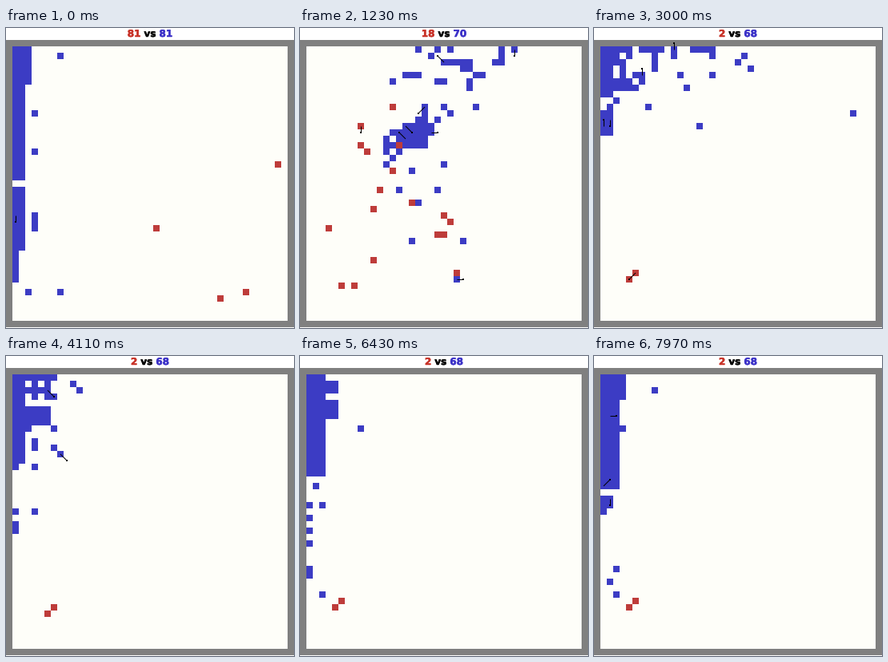
A matplotlib script that plays this animation: 360x376 px, repeating every 8000 ms.

```python
import numpy as np
import matplotlib.pyplot as plt
from matplotlib.animation import FuncAnimation
from matplotlib.collections import LineCollection
from matplotlib.patheffects import withStroke

W, H, DPI = 360, 376, 100
FRAMES, INTERVAL = 250, 32
CELL, LEFT, TOP, SIDE = 8, 8, 23, 43
PAPER, WALL = (254, 254, 249), (128, 128, 128)
RED, BLUE = (190, 60, 58), (60, 60, 196)
PX = 72 / DPI
rng = np.random.default_rng(12)

GRID = [(x, y) for x in range(SIDE) for y in range(SIDE)]
DIRS = [(x, y) for x in (-1, 0, 1) for y in (-1, 0, 1) if x or y]


def crowd(count, sx, sy, *blocks, center=(0, 0)):
    """Solid blocks (x, y, w, h) plus strays thinning out from a center."""
    solid = [(x + i, y + j) for x, y, w, h in blocks
             for j in range(h) for i in range(w)]
    free = [c for c in GRID if c not in solid]
    dist = np.abs(np.array(free) - center) / (sx, sy)
    weight = np.exp(-dist.sum(axis=1))
    picks = rng.choice(len(free), count - len(solid), replace=False,
                       p=weight / weight.sum())
    return solid + [free[i] for i in picks]


def scatter(count, x0, x1, y0, y1):
    spots = [(x, y) for x, y in GRID if x0 <= x < x1 and y0 <= y < y1]
    return [spots[i] for i in rng.choice(len(spots), count, replace=False)]


def match(a, b):
    """Give each end cell its nearest free starter; the rest get None."""
    pairs = sorted(((p[0] - q[0]) ** 2 + (p[1] - q[1]) ** 2, i, j)
                   for i, p in enumerate(a) for j, q in enumerate(b))
    ends, used = [None] * len(a), set()
    for _, i, j in pairs:
        if ends[i] is None and j not in used:
            ends[i] = b[j]
            used.add(j)
    return ends


def walk(start, end, n, spread=0.5):
    """Random walk on the grid, tied down at both ends."""
    u = np.linspace(0, 1, n + 1)[:, None]
    drift = np.vstack([[0, 0], rng.integers(-1, 2, (n, 2)).cumsum(0)])
    start, end = np.array(start), np.array(end)
    path = start + (end - start) * u + spread * (drift - u * drift[-1])
    return np.clip(np.rint(path), 0, SIDE - 1).astype(int)


def phase(a, b, t0, t1, front, last):
    """Living cells at each step; those without an end die on the way."""
    n, ends = t1 - t0, match(a, b)
    doomed = [i for i, e in enumerate(ends) if e is None]
    deaths = dict(zip(rng.permutation(doomed),
                      np.linspace(2, last, len(doomed))))
    steps = {t0 + k: [] for k in range(n + 1)}
    for i, (start, end) in enumerate(zip(a, ends)):
        if end is None:
            end = (np.array(start) + front) / 2 + rng.normal(0, 3, 2)
        for k, cell in enumerate(walk(start, end, n)):
            if k < deaths.get(i, n + 1):
                steps[t0 + k].append(tuple(cell))
    return steps


def settle(team, taken):
    """Move agents off occupied cells to the nearest free one."""
    out = []
    for x, y in team:
        if (x, y) in taken:
            x, y = min((c for c in GRID if c not in taken),
                       key=lambda c: (c[0] - x) ** 2 + (c[1] - y) ** 2)
        taken.add((x, y))
        out.append((x, y))
    return out


def pair(t):
    """The last two hop back and forth along the diagonal."""
    hop = int(0.935 * t - 0.3) % 2
    return [(5 + hop, 35 + hop), (4 + hop, 36 + hop)]


def build():
    # Blue meets red mid-field, pours into the corner, then down the wall
    clash = (crowd(45, 2, 5, (24, 22, 4, 4), (23, 19, 3, 2), center=(25, 21))
             + scatter(26, 14, 41, 0, 10))
    chase = (crowd(60, 9, 3, (25, 0, 3, 2), (13, 0, 2, 3), (2, 1, 2, 2))
             + scatter(8, 10, 17, 8, 34))
    corner = crowd(68, 8, 2.5, (0, 0, 2, 8), (2, 5, 3, 2), (0, 10, 2, 4),
                   (8, 0, 1, 4), (14, 0, 4, 1))
    pack = crowd(68, 3.5, 6, (0, 0, 2, 14), (2, 5, 4, 3), (2, 2, 3, 1),
                 (3, 0, 4, 1))
    wall = crowd(68, 1.5, 10, (0, 0, 3, 16), (3, 4, 2, 3), (3, 1, 2, 2))
    slide = crowd(68, 1.5, 10, (0, 0, 3, 18), (3, 0, 1, 4), (0, 19, 2, 2))
    keys = [(1, scatter(81, 24, 41, 2, 41)), (20, clash), (58, chase),
            (93, corner), (128, pack), (200, wall), (249, slide)]

    # The first picture still shows how the last battle ended
    blue = {0: crowd(81, 1.2, 40, (0, 0, 3, 6), (0, 6, 2, 15),
                     (0, 22, 2, 10), (0, 32, 1, 4))}
    red = {0: [(41, 18), (22, 28), (36, 38), (32, 39)]}
    for (t0, a), (t1, b) in zip(keys, keys[1:]):
        blue.update(phase(a, b, t0, t1, (22, 22), t1 - t0))

    ranks = (scatter(27, 3, 17, 6, 37)
             + crowd(12, 1, 4, (19, 33, 1, 3), center=(22, 27)))
    runner = (13, 31)
    red.update(phase(scatter(81, 2, 19, 2, 41), ranks, 1, 20, (22, 24), 19))
    red.update(phase(ranks, pair(58) + [runner], 20, 58, (14, 26), 30))
    for t in range(59, FRAMES):
        red[t] = pair(t) + [runner] * (t < 66)

    blows = []
    for t in range(FRAMES):
        taken = set()
        red[t] = settle(red[t], taken)
        blue[t] = settle(blue[t], taken)
        fighters = blue[t] + red[t]
        count = min(rng.poisson(10 if 8 < t < 40 else 2.2), 14)
        blows.append([fighters[rng.integers(len(fighters))]
                      + DIRS[rng.integers(8)] for _ in range(count)])
    return blue, red, blows


blue, red, blows = build()

stage = np.full((H, W, 3), 255, np.uint8)
stage[15:375] = WALL
stage[TOP:TOP + SIDE * CELL, LEFT:LEFT + SIDE * CELL] = PAPER

fig = plt.figure(figsize=(W / DPI, H / DPI), dpi=DPI, facecolor="white")
ax = fig.add_axes([0, 0, 1, 1])
ax.axis("off")
picture = ax.imshow(stage, extent=(0, W, H, 0), interpolation="nearest",
                    aspect="auto")
ax.set_xlim(0, W)
ax.set_ylim(H, 0)
lines = ax.add_collection(LineCollection([], colors="black", linewidths=PX))
dots, = ax.plot([], [], "s", color="black", ms=2 * PX, mew=0)
score = [ax.text(0, 11, "", color=c, fontsize=12 * PX, weight="bold",
                 family="DejaVu Sans",
                 path_effects=[withStroke(linewidth=0.5 * PX, foreground=c)])
         for c in ("#c83228", "black", "#3c32c8")]


def paint(img, team, color):
    for x, y in team:
        px, py = LEFT + x * CELL, TOP + y * CELL
        img[py:py + CELL, px:px + CELL] = color


def set_score(a, b, gap=4):
    for text, word in zip(score, (str(a), "vs", str(b))):
        text.set_text(word)
    render = fig.canvas.get_renderer()
    widths = [t.get_window_extent(render).width for t in score]
    x = W / 2 - (sum(widths) + 2 * gap) / 2
    for text, w in zip(score, widths):
        text.set_x(x)
        x += w + gap


def middle(x, y):
    return LEFT + (x + 0.5) * CELL, TOP + (y + 0.5) * CELL


def draw(t):
    img = stage.copy()
    paint(img, blue[t], BLUE)
    paint(img, red[t], RED)
    picture.set_data(img)
    hits = [(middle(x, y), middle(x + dx, y + dy))
            for x, y, dx, dy in blows[t]]
    lines.set_segments(hits)
    dots.set_data([b[0] for _, b in hits], [b[1] for _, b in hits])
    set_score(*((len(red[t]), len(blue[t])) if t else (81, 81)))
    return [picture, lines, dots, *score]


anim = FuncAnimation(fig, draw, frames=FRAMES, interval=INTERVAL,
                     init_func=lambda: draw(0), repeat=True, repeat_delay=0)
plt.show()
```
